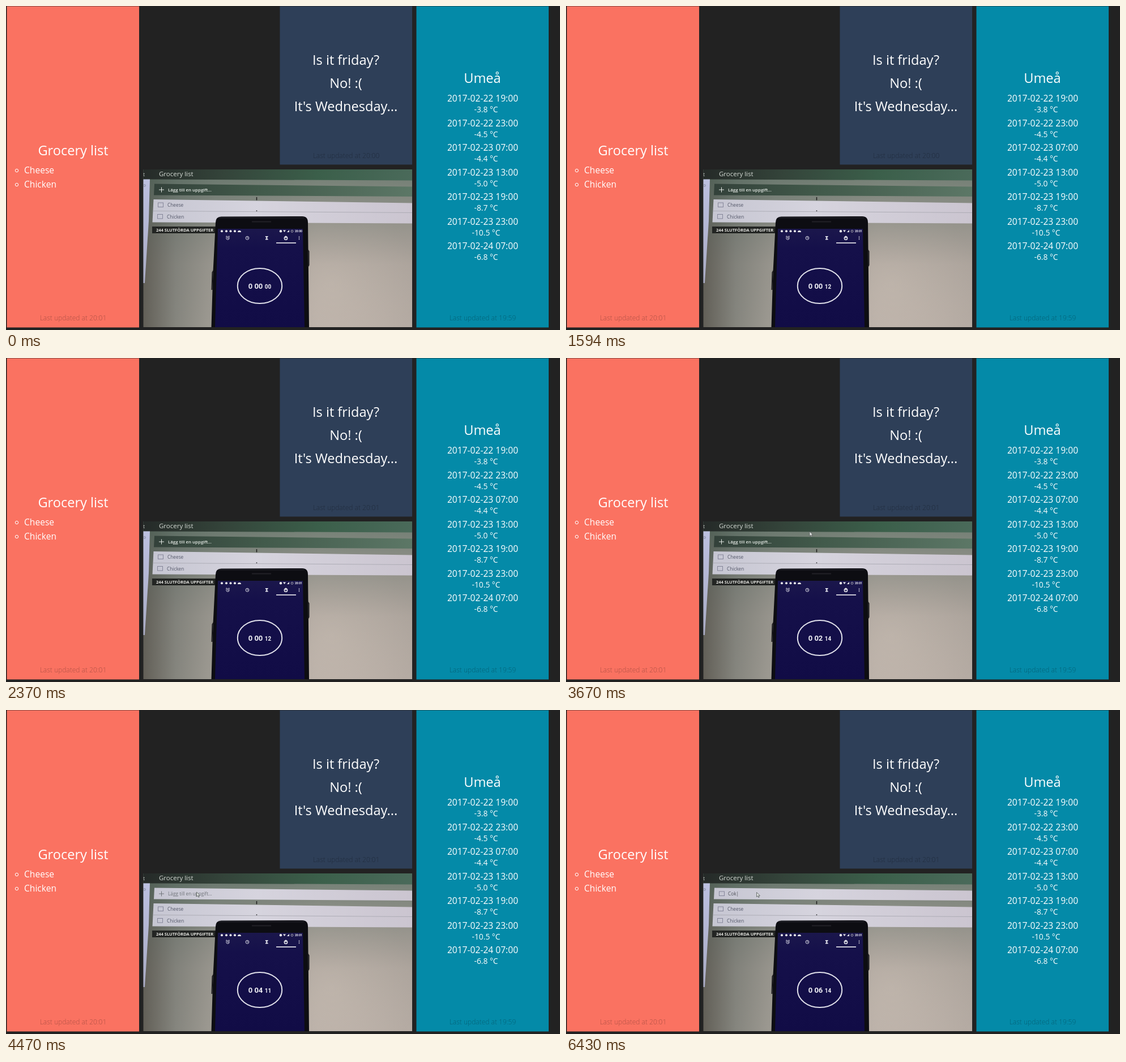
These frames come from a looping animation (978 px wide and 573 px high, 8 s). An HTML page:

```html
<!DOCTYPE html>
<html lang="en">
<head>
<meta charset="utf-8">
<title>Dashboard</title>
<style>
  html, body { margin: 0; width: 100%; height: 100%; overflow: hidden; background: #222; }
  svg { display: block; width: 978px; height: 573px; }
  text { font-family: "Open Sans", "Noto Sans", sans-serif; fill: #fff; white-space: pre; }
  .mid { text-anchor: middle; }
  .title { font-size: 23.6px; }
  .item { font-size: 15.6px; font-weight: 500; }
  .temp { font-size: 13.8px; font-weight: 500; }
  .foot { font-size: 12px; font-weight: 300; fill: #000; fill-opacity: .3; }
  .soft text { font-size: 8.3px; fill: #55586a; }
  .phone text { font-family: Roboto, "Open Sans", sans-serif; font-weight: 700; fill: #f1f1f6; }
</style>
</head>
<body>
<svg id="stage" viewBox="0 0 978 573" xmlns="http://www.w3.org/2000/svg">
  <defs>
    <clipPath id="photo"><rect x="242.5" y="289" width="474.5" height="279"/></clipPath>
    <linearGradient id="wall">
      <stop offset="0" stop-color="#625f57"/><stop offset=".12" stop-color="#85857e"/>
      <stop offset=".27" stop-color="#a19d95"/><stop offset=".65" stop-color="#b8aea6"/>
      <stop offset="1" stop-color="#b5aba3"/>
    </linearGradient>
    <linearGradient id="shade" x2="0" y2="1">
      <stop offset="0" stop-color="#3f5d50" stop-opacity=".6"/>
      <stop offset=".25" stop-color="#4d6159" stop-opacity=".4"/>
      <stop offset=".6" stop-color="#5c605c" stop-opacity=".1"/>
      <stop offset="1" stop-color="#5c605c" stop-opacity="0"/>
    </linearGradient>
    <radialGradient id="glow" gradientUnits="userSpaceOnUse" cx="575" cy="490" r="150">
      <stop offset="0" stop-color="#cfc3b8" stop-opacity=".55"/>
      <stop offset="1" stop-color="#cfc3b8" stop-opacity="0"/>
    </radialGradient>
    <linearGradient id="head">
      <stop offset="0" stop-color="#252a28"/><stop offset=".3" stop-color="#34443a"/>
      <stop offset=".65" stop-color="#3b5f4a"/><stop offset="1" stop-color="#4a6a5a"/>
    </linearGradient>
    <linearGradient id="bar">
      <stop offset="0" stop-color="#33413a"/><stop offset=".4" stop-color="#41594a"/>
      <stop offset="1" stop-color="#5c7766"/>
    </linearGradient>
    <linearGradient id="row">
      <stop offset="0" stop-color="#c6c6d2"/><stop offset=".4" stop-color="#d6d4de"/>
      <stop offset="1" stop-color="#cbc5d0"/>
    </linearGradient>
    <linearGradient id="strip" x2="0" y2="1">
      <stop offset="0" stop-color="#bcc0e0"/><stop offset="1" stop-color="#a9abc4"/>
    </linearGradient>
    <linearGradient id="screen" x2="0" y2="1">
      <stop offset="0" stop-color="#1b174c"/><stop offset=".2" stop-color="#15104a"/>
      <stop offset="1" stop-color="#110c46"/>
    </linearGradient>
  </defs>

  <rect width="978" height="573" fill="#222"/>
  <g id="tiles"></g>

  <g clip-path="url(#photo)">
    <g class="soft">
      <rect x="242" y="289" width="476" height="280" fill="url(#wall)"/>
      <rect x="242" y="289" width="476" height="280" fill="url(#glow)"/>
      <rect x="242" y="289" width="476" height="280" fill="url(#shade)"/>
      <path d="M242 289H717V308.500L242 306.500Z" fill="url(#head)"/>
      <path d="M242 306.500H254L252 380L245 490H242Z" fill="url(#strip)"/>
      <text x="242" y="301" style="fill:#d8dcd8">t</text>
      <circle cx="244.500" cy="317.500" r="1.800" fill="none" stroke="#7d8398"/>
      <text x="270" y="301" style="font-size:11.5px;fill:#d5dbd5">Grocery list</text>

      <path id="entry" d="M262 314.500L717 319.500V337L261 334.500Z"/>
      <path id="plus" d="M270 325H279M274.500 320.500V329.500" fill="none"/>
      <rect id="box" x="270.500" y="321" width="9" height="7.500" fill="none" stroke="#85869a"/>
      <text id="typed" x="286" y="327.800"></text>

      <path d="M260.500 342L717 348.500V384.500L258.500 382.500Z" fill="url(#row)"/>
      <path d="M260 362.500L717 365.500" stroke="#a5a5ae" stroke-width=".8"/>
      <g fill="none" stroke="#85869a">
        <rect x="268.500" y="348" width="9" height="7.500"/>
        <rect x="267.500" y="368.500" width="9" height="7.500"/>
      </g>
      <text x="285" y="355">Cheese</text>
      <text x="284" y="375.500">Chicken</text>
      <path d="M442.500 338V343.500M442.500 361.500V363" stroke="#1c1c1c" stroke-width="1.500"/>
      <rect x="258" y="390" width="112" height="12" fill="#232523"/>
      <text x="265" y="399" style="font-size:7.5px;font-weight:700;fill:#e4e4e0">244 SLUTFÖRDA UPPGIFTER</text>
    </g>

    <g class="phone">
      <path d="M370 383Q370 372.500 380 372.500L523 372Q533 372 533 383L534 470L535 568H362.500L365.500 470Z" fill="#0d0d12"/>
      <path d="M532.500 431L534.500 434V458L533 461M366.500 468L364.500 471L363.500 502" fill="none" stroke="#1b1a1e" stroke-width="2"/>
      <path d="M375 374.500H526" stroke="#282830"/>
      <path d="M434 381.500H468" stroke="#222127" stroke-width="2"/>
      <path d="M374 394H524L527 568H369Z" fill="url(#screen)"/>
      <g id="icons" fill="#eee"></g>
      <g fill="none" stroke="#dcdce6">
        <circle cx="391.500" cy="410.500" r="2.700"/>
        <path d="M388 408L390 406.500M395 408L393 406.500M391.500 409V411H393" stroke-width=".9"/>
        <circle cx="426" cy="410.300" r="2.900"/>
        <path d="M426 408.500V410.500H427.500" stroke-width=".9"/>
        <path d="M458 407.500H462.500L460.200 410.300L462.500 413H458L460.200 410.300Z" fill="#dcdce6"/>
        <circle cx="494" cy="410.700" r="2.700" stroke="#fff" stroke-width="1.300"/>
        <path d="M494 406.500V411" stroke="#fff" stroke-width="1.300"/>
        <path d="M477 419H512" stroke="#fff" stroke-width="1.500"/>
      </g>
      <text id="clock" x="510" y="400.200" style="font-size:5px"></text>
      <ellipse cx="448" cy="495" rx="39.200" ry="31" fill="none" stroke="#e0e0ea" stroke-width="2"/>
      <text id="secs" x="427.700" y="499.700" style="font-size:13px"></text>
      <text id="cents" x="456.700" y="499.700" style="font-size:10px"></text>
    </g>

    <path id="cursor" d="M0 0V8L2 6.300L3.400 9.200L4.700 8.500L3.300 5.800H6Z" fill="#dfe2e0" stroke="#555a5a" stroke-width=".8"/>
  </g>
</svg>

<script>
const $ = id => document.getElementById(id);
const label = (x, y, cls, str, id = '') =>
  `<text x="${x}" y="${y}" class="${cls}" id="${id}">${str}</text>`;
const panel = (x, h, color) =>
  `<rect x="${x}" y="0.5" width="233.5" height="${h}" fill="${color}"/>`;

const groceries = ['Cheese', 'Chicken'];
const lines = ['Is it friday?', 'No! :(', "It's Wednesday..."];
const forecast = [
  ['22 19', '-3.8'], ['22 23', '-4.5'], ['23 07', '-4.4'], ['23 13', '-5.0'],
  ['23 19', '-8.7'], ['23 23', '-10.5'], ['24 07', '-6.8']
];

$('tiles').innerHTML =
  panel(1.5, 568, '#fa7261') + panel(483.5, 280, '#2e3f58') + panel(724.5, 568, '#048aa8') +
  label(118.5, 264, 'mid title', 'Grocery list') +
  groceries.map((g, i) =>
    `<circle cx="19" cy="${291 + i * 25}" r="2.7" fill="none" stroke="#fff"/>` +
    label(32, 296 + i * 25, 'item', g)).join('') +
  lines.map((s, i) => label(600, 104 + i * 41, 'mid title', s)).join('') +
  label(841, 136, 'mid title', 'Umeå') +
  forecast.map(([when, deg], i) => {
    const y = Math.round(169 + i * 43.55);
    return label(841.5, y, 'mid item', `2017-02-${when}:00`) +
           label(847.5, y + 19, 'mid temp', `${deg} °C`);
  }).join('') +
  label(118.5, 556, 'mid foot', 'Last updated at 20:01') +
  label(600.5, 268.5, 'mid foot', '', 'updated') +
  label(841.5, 556, 'mid foot', 'Last updated at 19:59');

const dot = (x, y, r) => `<circle cx="${x}" cy="${y}" r="${r}"/>`;
$('icons').innerHTML =
  [381, 389, 396.5, 404].map(x => dot(x, 398.3, 2)).join('') +
  '<path d="M409 400Q409 397 412 397Q415 397 415 400ZM489 396.5H494L491.5 400ZM496 400H500V396Z"/>' +
  dot(485, 398.3, 2.2) +
  '<circle cx="505" cy="398.3" r="1.9" fill="none" stroke="#ccc" stroke-width=".8"/>' +
  [408, 410.3, 412.6].map(y => dot(517.5, y, .8)).join('');

const hint = 'Lägg till en uppgift...';
const dark = { fill: 'url(#bar)', ink: '#e6ebe6', weight: 600, text: hint };
const light = { fill: 'url(#row)', ink: '#70747a', weight: 400, text: hint };
const typing = { fill: 'url(#row)', ink: '#50535a', weight: 400, text: 'Cok|', box: true };

// start ms, tile time, phone time, seconds, hundredths, entry field, cursor
const steps = [
  [0, '20:00', '20:00', '0 00', '00', dark],
  [430, '20:00', '20:01', '0 00', '12', dark],
  [2370, '20:01', '20:01', '0 00', '12', dark],
  [2470, '20:01', '20:01', '0 02', '14', dark, [430, 307]],
  [4470, '20:01', '20:01', '0 04', '11', light, [336.5, 322]],
  [6430, '20:01', '20:01', '0 06', '14', typing, [336.5, 322.5]]
];

let current;
function show(step) {
  const [, tile, phone, secs, cents, entry, cursor] = step;
  $('updated').textContent = `Last updated at ${tile}`;
  $('clock').textContent = phone;
  $('secs').textContent = secs;
  $('cents').textContent = cents;
  $('entry').setAttribute('fill', entry.fill);
  $('typed').textContent = entry.text;
  $('typed').style.cssText =
    `fill:${entry.ink};font-weight:${entry.weight};font-size:${entry.weight > 400 ? 7.9 : 8.3}px`;
  $('plus').setAttribute('stroke', entry.ink);
  $('plus').style.display = entry.box ? 'none' : '';
  $('box').style.display = entry.box ? '' : 'none';
  $('cursor').style.display = cursor ? '' : 'none';
  if (cursor) $('cursor').setAttribute('transform', `translate(${cursor})`);
}

const begin = performance.now();
function tick() {
  const t = (performance.now() - begin) % 8000;
  const step = steps.findLast(s => s[0] <= t);
  if (step !== current) show(current = step);
  requestAnimationFrame(tick);
}
tick();
</script>
</body>
</html>
```
